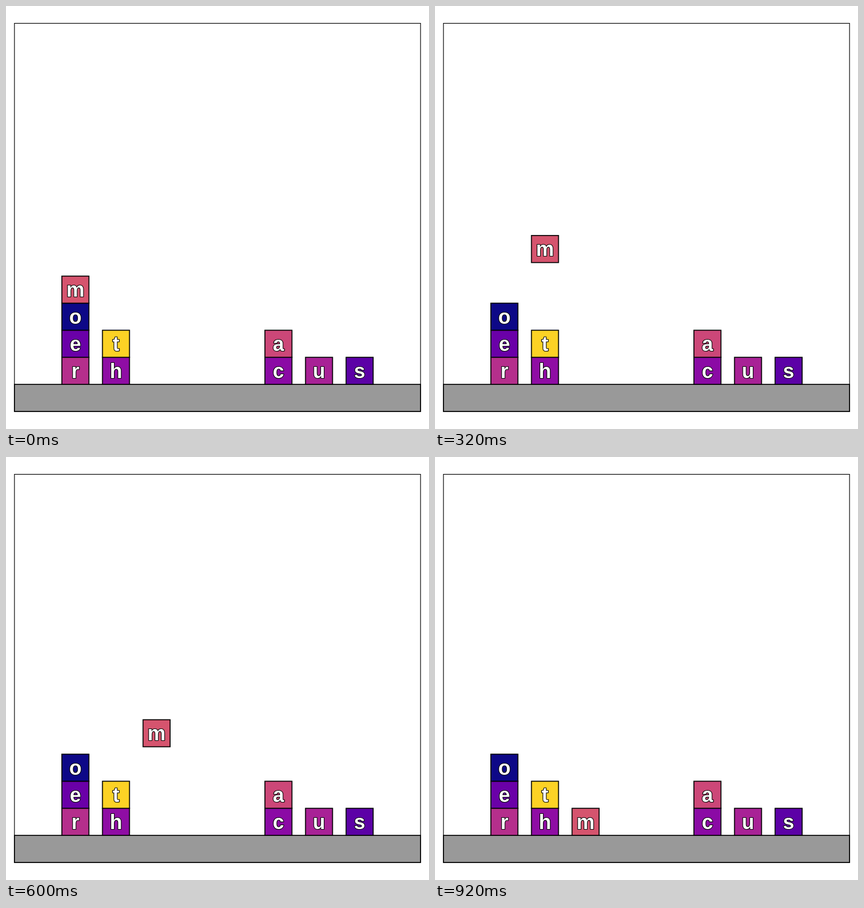
Recreate the animation shown at these times as an HTML page. Size 748 by 748 pixels, loop 960 ms.

```html
<!DOCTYPE html>
<html lang="en">
<head>
<meta charset="utf-8">
<title>Block stacking</title>
<style>
  html, body { margin: 0; width: 100%; height: 100%; overflow: hidden; background: #fff; }
  svg { display: block; width: 100vw; height: 100vh; }
  rect { stroke: #000; stroke-width: 1.7; }
  text {
    font: bold 36px "Liberation Sans", Arial, sans-serif;
    text-anchor: middle; fill: #fff;
    stroke: #000; stroke-width: 2.2; stroke-linejoin: round; paint-order: stroke;
  }
</style>
</head>
<body>
<svg id="stage" viewBox="0 0 748 748">
  <rect x="14.96" y="30.6" width="718.08" height="686.3" fill="none" style="stroke-width:1.2"/>
  <rect x="14.96" y="669.1" width="718.08" height="47.87" fill="#999"/>
</svg>
<script>
const NS = "http://www.w3.org/2000/svg";
const stage = document.getElementById("stage");
const SIZE = 47.872, PITCH = SIZE * 1.5;
const LEFT = 98.74, FLOOR = 669.1;
const TICK = 40, TICKS = 24;

// Each stack: column, then letters and colours from the floor up
const stacks = [
  [0, "r#b52f8c", "e#6a00a8", "o#0d0887"],
  [1, "h#8f0da4", "t#fcd225"],
  [5, "c#8b0aa5", "a#cc4778"],
  [6, "u#a82296"],
  [7, "s#5c01a6"]
];

function add(parent, tag, attrs) {
  const el = document.createElementNS(NS, tag);
  for (const key in attrs) el.setAttribute(key, attrs[key]);
  return parent.appendChild(el);
}

function place(block, col, level) {
  const x = LEFT + col * PITCH;
  const y = FLOOR - (level + 1) * SIZE;
  block.setAttribute("transform", `translate(${x.toFixed(3)} ${y.toFixed(3)})`);
}

function makeBlock(spec, col, level) {
  const block = add(stage, "g", {});
  add(block, "rect", { width: SIZE, height: SIZE, fill: spec.slice(1) });
  add(block, "text", { x: SIZE / 2, y: 36.3 }).textContent = spec[0];
  place(block, col, level);
  return block;
}

for (const [col, ...specs] of stacks) {
  specs.forEach((spec, level) => makeBlock(spec, col, level));
}
const mover = makeBlock("m#d5546e", 0, 3);

const ramp = (n, from, to) => Math.min(1, Math.max(0, (n - from) / (to - from)));

// Lift, carry two columns across, lower to the floor
function render(ms) {
  const n = Math.floor(ms / TICK) % TICKS;
  const col = 2 * ramp(n, 4, 12);
  const level = 3 + 1.5 * ramp(n, 0, 4) - 4.5 * ramp(n, 12, 23);
  place(mover, col, level);
}

const start = performance.now();
function loop() {
  render(performance.now() - start);
  requestAnimationFrame(loop);
}
loop();
</script>
</body>
</html>
```
